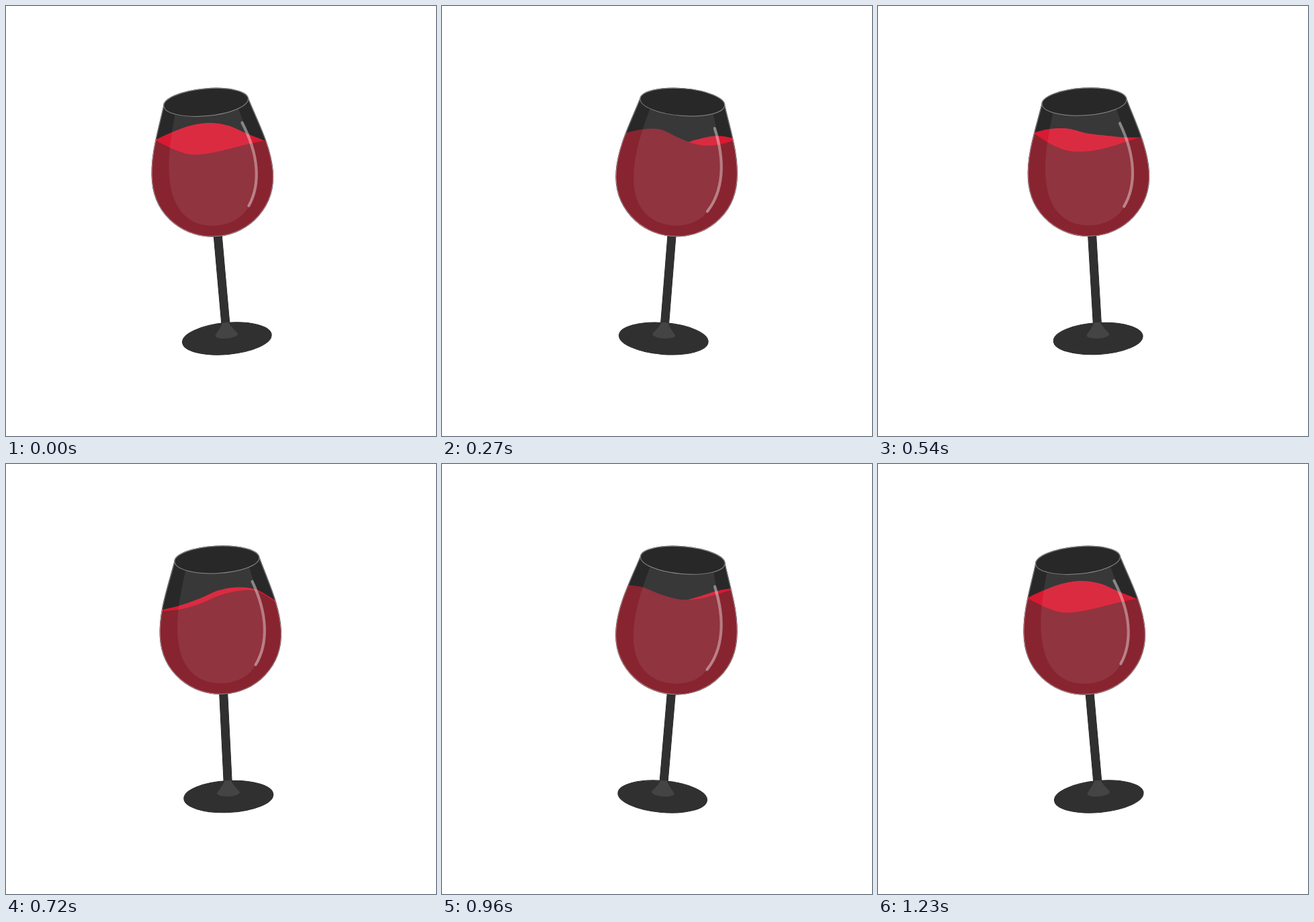
Animation of 640x640 px, one loop 1260 ms. Source, as an HTML page with a canvas:

```html
<!DOCTYPE html>
<html lang="en">
<head>
<meta charset="utf-8">
<title>Swirling wine</title>
<style>
  html, body { margin: 0; width: 100%; height: 100%; overflow: hidden; background: #fff; }
  canvas { display: block; }
</style>
</head>
<body>
<canvas id="stage" width="640" height="640"></canvas>
<script>
const ctx = document.getElementById('stage').getContext('2d');
const LOOP = 1260, STEP = 30, SWIRL = 615;
const BASE_Y = 495;

// Glass shapes: x is measured from the glass axis.
const bowl = new Path2D('M-63 142C-75 180-90 215-90 252C-90 305-48 342 0 342S90 305 90 252C90 215 75 180 63 142A63 20.3 0 0 0-63 142Z');
const inner = new Path2D('M-46 150C-56 188-64 215-64 250C-64 300-38 326 0 326S64 300 64 250C64 215 56 188 46 150Z');
const shine = new Path2D('M51 177C71 225 71 270 50 301');
const cone = new Path2D('M-5 471C-8 480-16 486-17 489.5C-15 496.5 15 496.5 17 489.5C16 486 8 480 5 471Z');
const stem = new Path2D('M-6 335H6V476H-6Z');
const rim = new Path2D();
rim.ellipse(0, 142, 63, 20.3, 0, 0, 7);
const foot = new Path2D();
foot.ellipse(0, BASE_Y, 66.5, 23.5, 0, 0, 7);

// Wine edge heights from left to right at points of one swirl.
const GAP = 28;
const waves = [
  { at: 0,    front: [198, 212, 221, 219, 213, 206, 200], back: [201, 188, 178, 174, 178, 190, 201] },
  { at: .171, front: [219, 216, 208, 196, 189, 189, 205], back: [217, 210, 200, 188, 183.5, 187, 203] },
  { at: .244, front: [213, 207, 196, 187, 187, 196, 215], back: [213, 207, 195.5, 185, 180, 181, 191] },
  { at: .366, front: [196, 186, 181, 194, 207, 211, 206], back: [205, 210, 210, 205, 197, 194, 202] },
  { at: .634, front: [175, 184, 199, 204, 199, 189, 180], back: [180, 190, 202, 204, 198, 188, 179] },
  { at: .756, front: [176, 195, 207, 210, 206, 197, 187], back: [181, 182, 191, 206, 207, 199, 189] }
];

const spline = (a, b, c, d, t) =>
  b + t / 2 * (c - a + t * (2 * a - 5 * b + 4 * c - d + t * (3 * (b - c) + d - a)));

function edgeAt(name, turn) {
  const n = waves.length;
  const i = waves.findLastIndex(w => w.at <= turn);
  const end = i + 1 < n ? waves[i + 1].at : 1;
  const t = (turn - waves[i].at) / (end - waves[i].at);
  const [a, b, c, d] = [-1, 0, 1, 2].map(k => waves[(i + k + n) % n][name]);
  return b.map((_, j) => spline(a[j], b[j], c[j], d[j], t));
}

function fillWine(edge, centre, color) {
  const last = edge.length - 1;
  const point = k => k < 0 ? 2 * edge[0] - edge[1]
    : k > last ? 2 * edge[last] - edge[last - 1] : edge[k];
  ctx.beginPath();
  ctx.moveTo(centre - 110, 360);
  for (let x = -100; x <= 100; x += 2) {
    const s = x / GAP + last / 2;
    const k = Math.max(0, Math.min(last - 1, Math.floor(s)));
    const y = s < 0 ? edge[0] + s * (edge[1] - edge[0])
      : s > last ? edge[last] + (s - last) * (edge[last] - edge[last - 1])
      : spline(point(k - 1), point(k), point(k + 1), point(k + 2), s - k);
    ctx.lineTo(centre + x, y);
  }
  ctx.lineTo(centre + 110, 360);
  ctx.fillStyle = color;
  ctx.fill();
}

function fill(path, color) {
  ctx.fillStyle = color;
  ctx.fill(path);
}

function stroke(path, color, width) {
  ctx.strokeStyle = color;
  ctx.lineWidth = width;
  ctx.stroke(path);
}

function draw(time) {
  const t = Math.floor(time % LOOP / STEP) * STEP;
  const turns = t / SWIRL;
  const phase = (turns - 5 / 360) * 2 * Math.PI;
  const tilt = -5.1 * Math.cos(phase) * Math.PI / 180;
  const baseX = 329 + (turns < 1 ? 1.8 : 2.7) * Math.sin(phase);
  const centre = baseX + 295 * Math.sin(tilt);

  ctx.resetTransform();
  ctx.fillStyle = '#fff';
  ctx.fillRect(0, 0, 640, 640);
  ctx.translate(baseX, BASE_Y);
  ctx.rotate(tilt);
  ctx.translate(0, -BASE_Y);

  for (const part of [foot, stem]) {
    stroke(part, '#1c1c1c', 1);
    fill(part, '#303030');
  }
  fill(cone, '#444');

  stroke(bowl, '#1c1c1c', 1.5);
  fill(bowl, '#282828');
  ctx.save();
  ctx.clip(bowl);
  // The liquid keeps its own level while the glass leans.
  ctx.resetTransform();
  fillWine(edgeAt('back', turns % 1), centre, '#d81a32');
  fillWine(edgeAt('front', turns % 1), centre, '#87242f');
  ctx.restore();

  fill(inner, 'rgba(255,255,255,.075)');
  stroke(bowl, 'rgba(255,255,255,.45)', 1);
  fill(rim, '#282828');
  stroke(rim, '#8a8a8a', 1);
  ctx.lineCap = 'round';
  stroke(shine, 'rgba(255,255,255,.4)', 4.2);
}

function tick() {
  draw(performance.now());
  requestAnimationFrame(tick);
}
tick();
</script>
</body>
</html>
```
